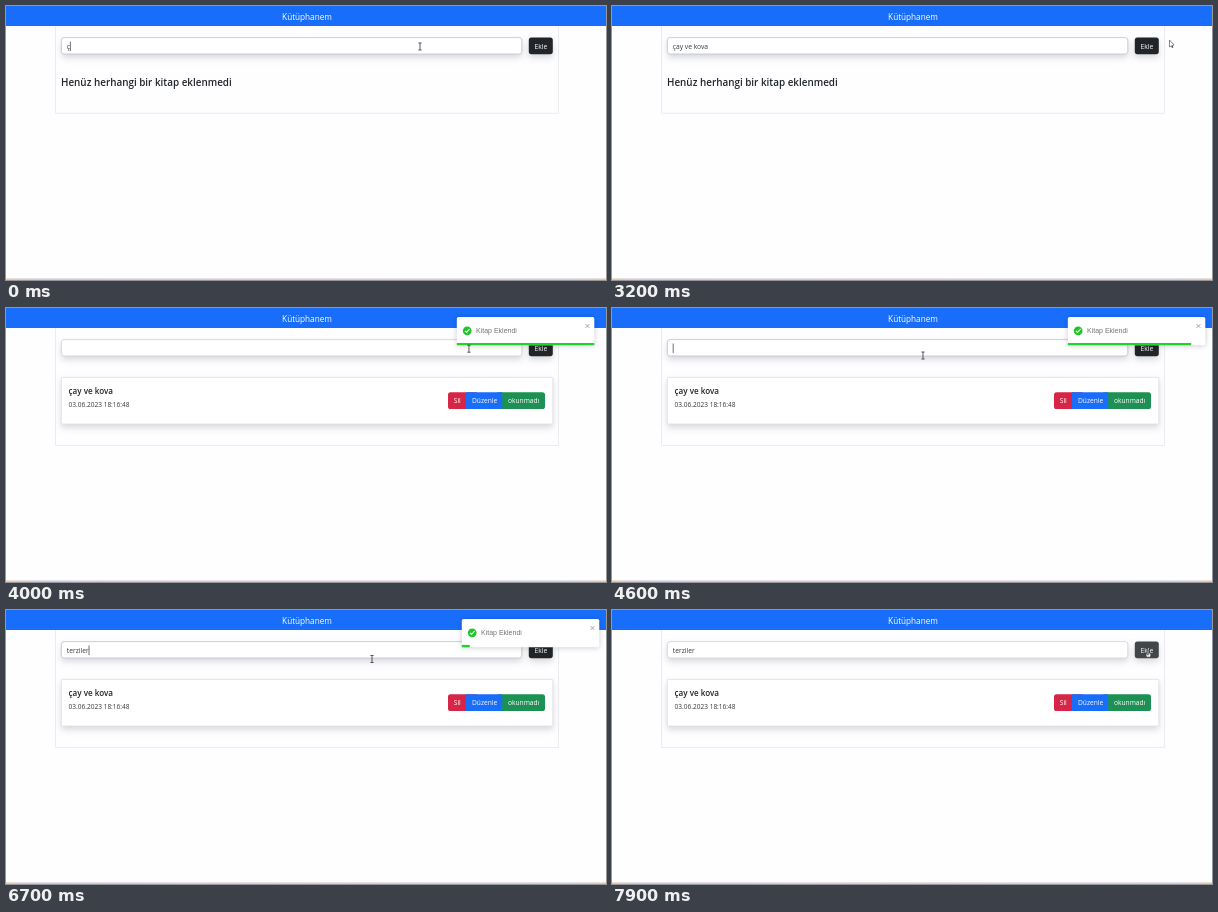
Recreate the animation shown at these times as an HTML page with a canvas. Size 600x274 px, loop 8 s.

```html
<!DOCTYPE html>
<html lang="tr">
<head>
<meta charset="utf-8">
<title>Kütüphanem</title>
<style>
  html, body { margin: 0; width: 100%; height: 100%; overflow: hidden; background: #fefdff; }
  canvas { display: block; width: 600px; height: 274px; }
</style>
</head>
<body>
<canvas id="stage"></canvas>
<script>
const W = 600, H = 274, LOOP = 8000, SCALE = 0.43;
const UI = '"Open Sans", "Noto Sans", sans-serif';
const BLUE = '#186dfb', DARK = '#212529', GREEN = '#20d32c';
const BOOK = 'çay ve kova', NEXT = 'terziler';
const ADDED = 3500, FOCUS = 4450, TYPE = 5000, BLUR = 7850;
const TOAST_IN = 3650, TOAST_RUN = 4345, TOAST_OUT = 6845, BOUNCE = 700;

// Pointer stops: time, x, y
const MOUSE = [
  { t: 2700, x: 414, y: 40.5 },
  { t: 3200, x: 557.5, y: 34 },
  { t: 3500, x: 540, y: 41 },
  { t: 3600, x: 546, y: 37 },
  { t: 4600, x: 311, y: 47.5 },
  { t: 6700, x: 366, y: 49 },
  { t: 7900, x: 536, y: 40 }
];

const canvas = document.getElementById('stage');
const ctx = canvas.getContext('2d');
const dpr = window.devicePixelRatio || 1;
canvas.width = W * dpr;
canvas.height = H * dpr;

const clamp = v => Math.max(0, Math.min(1, v));
const mix = (a, b, p) => a + (b - a) * p;
const smooth = v => { const p = clamp(v); return p * p * (3 - 2 * p); };
const easeOut = p => 1 - (1 - clamp(p)) ** 3;

function pointer(t) {
  const next = MOUSE.findIndex(m => m.t > t);
  if (next === 0) return MOUSE[0];
  if (next < 0) return MOUSE[MOUSE.length - 1];
  const a = MOUSE[next - 1], b = MOUSE[next];
  const p = smooth((t - a.t) / (b.t - a.t));
  return { x: mix(a.x, b.x, p), y: mix(a.y, b.y, p) };
}

function text(str, x, y, size, color, weight = 400, family = UI) {
  ctx.font = `${weight} ${size}px ${family}`;
  ctx.fillStyle = color;
  ctx.fillText(str, x, y);
}

function box(x, y, w, h, r, fill, stroke) {
  ctx.beginPath();
  ctx.roundRect(x, y, w, h, r);
  if (fill) { ctx.fillStyle = fill; ctx.fill(); }
  if (stroke) {
    ctx.shadowColor = 'transparent';
    ctx.strokeStyle = stroke;
    ctx.lineWidth = 0.8;
    ctx.stroke();
  }
}

function shadowed(dy, blur, alpha, draw) {
  ctx.save();
  ctx.shadowColor = `rgba(0,0,0,${alpha})`;
  ctx.shadowOffsetY = dy * dpr;
  ctx.shadowBlur = blur * dpr;
  draw();
  ctx.restore();
}

function line(x1, y1, x2, y2, color, width) {
  ctx.beginPath();
  ctx.moveTo(x1, y1);
  ctx.lineTo(x2, y2);
  ctx.strokeStyle = color;
  ctx.lineWidth = width;
  ctx.stroke();
}

// One letter per step; the caret blinks from the latest keystroke.
function typeOut(str, t, start, step) {
  const n = Math.max(0, Math.min(str.length, 1 + Math.floor((t - start) / step)));
  const last = n ? start + (n - 1) * step : FOCUS;
  return { str: str.slice(0, n), caret: Math.floor((t - last) / 500) % 2 === 0 };
}

function field(t) {
  if (t < ADDED) return typeOut(BOOK, t, 0, 240);
  if (t < FOCUS) return { str: '', caret: false };
  return typeOut(NEXT, t, TYPE, 200);
}

function drawForm(t, mouse) {
  const { str, caret } = field(t);
  const focus = t < ADDED || (t >= FOCUS && t < BLUR);
  shadowed(3.4, 6.9, 0.15, () =>
    box(55.4, 31.6, 460.4, 16.4, 2.6, '#fff', focus ? '#b6c5db' : '#ced3d9'));
  text(str, 60.8, 42.5, 6.7, '#34383c');
  if (caret && focus) {
    const x = 61.2 + ctx.measureText(str).width;
    line(x, 35.5, x, 45, '#333', 0.7);
  }
  const hover = overButton(mouse);
  shadowed(3.4, 6.9, 0.15, () => box(522.8, 31.4, 24, 16.8, 2.6, hover ? '#424649' : DARK));
  text('Ekle', 528.4, 42.6, 6.8, '#fff');
}

function drawCard() {
  shadowed(3.4, 6.9, 0.15, () => box(55.4, 69.4, 491.4, 46.6, 0.5, '#fff', '#e0e0e3'));
  text(BOOK, 62.5, 86, 8.1, DARK, 600);
  text('03.06.2023 18:16:48', 62.5, 99.3, 6.55, '#34383c');
  box(442, 84.2, 30, 16.8, 2.6, '#d62546');
  box(490, 84.2, 49, 16.8, 2.6, '#1d9154');
  box(460, 84.2, 36.2, 16.8, 0, BLUE);
  text('Sil', 447.8, 95.4, 6.65, '#fff');
  text('Düzenle', 466, 95.4, 6.65, '#fff');
  text('okunmadı', 502, 95.4, 6.65, '#fff');
}

// Flies in past its place and wobbles to rest; leaves with a short pull back.
function toastX(t) {
  if (t < TOAST_RUN) {
    const p = (t - TOAST_IN) / BOUNCE, q = p - 0.6;
    return q < 0
      ? mix(3000, -25, easeOut(p / 0.6))
      : -25 * Math.exp(-6 * q) * Math.cos(Math.PI * q / 0.15);
  }
  const p = (t - TOAST_OUT) / BOUNCE;
  return 2020 * smooth((p - 0.2) / 0.8) - 20 * smooth(p / 0.2);
}

function drawToast(t) {
  if (t < TOAST_IN || t > TOAST_OUT + BOUNCE) return;
  ctx.save();
  ctx.translate(toastX(t) * SCALE, 0);
  ctx.globalAlpha = 1 - smooth(((t - TOAST_OUT) / BOUNCE - 0.2) / 0.8);
  shadowed(0.5, 5, 0.2, () => box(455.8, 9, 137.5, 28.3, 1.7, '#fff'));
  box(461.8, 18.4, 8.8, 8.8, 4.4, '#20c52a');
  line(464, 22.8, 465.8, 24.6, '#fff', 1.1);
  line(465.4, 24.6, 468.6, 21, '#fff', 1.1);
  text('Kitap Eklendi', 475, 25.3, 7, '#757575', 400, '"Liberation Sans", Arial, sans-serif');
  for (const d of [-1.9, 1.9]) line(586.5 - d, 16.1, 586.5 + d, 19.9, '#8d8d8d', 0.8);
  const left = 1 - clamp((t - TOAST_RUN) / (TOAST_OUT - TOAST_RUN));
  box(455.8, 34.9, 137.5 * left, 2.4, 0, GREEN);
  ctx.restore();
}

const overInput = ({ x, y }) => x > 55 && x < 516 && y > 31 && y < 50;
const overButton = ({ x, y }) => x > 522 && x < 547 && y > 31 && y < 48;

function drawBeam(x, y) {
  line(x, y - 3.5, x, y + 3.5, '#333', 0.8);
  for (const d of [-3.5, 3.5]) line(x - 1.6, y + d, x + 1.6, y + d, '#333', 0.8);
}

function drawHand(x, y) {
  box(x - 2, y + 3, 4.8, 4.2, 1.2, '#fff', '#333');
  box(x - 0.8, y, 1.6, 5, 0.8, '#fff', '#333');
}

function drawArrow(x, y) {
  line(x + 2, y + 5, x + 3.2, y + 7.8, '#555', 1.5);
  ctx.beginPath();
  ctx.moveTo(x, y);
  ctx.lineTo(x, y + 6.8);
  ctx.lineTo(x + 4.6, y + 5);
  ctx.closePath();
  ctx.fillStyle = '#fff';
  ctx.fill();
  ctx.strokeStyle = '#555';
  ctx.lineWidth = 0.7;
  ctx.stroke();
}

function drawMouse(m) {
  const draw = overInput(m) ? drawBeam : overButton(m) && m.x < 545 ? drawHand : drawArrow;
  draw(m.x, m.y);
}

function drawEdge() {
  const g = ctx.createLinearGradient(0, 0, W, 0);
  g.addColorStop(0, '#ecc9a4');
  g.addColorStop(0.05, '#cfcbe0');
  g.addColorStop(0.45, '#e6c8d4');
  g.addColorStop(0.95, '#d0cedd');
  g.addColorStop(1, '#ecc9a4');
  ctx.fillStyle = g;
  ctx.fillRect(0, 272.4, W, 1.6);
}

function render(t) {
  const mouse = pointer(t);
  const added = t >= ADDED;
  ctx.setTransform(dpr, 0, 0, dpr, 0, 0);
  ctx.fillStyle = '#fefdff';
  ctx.fillRect(0, 0, W, H);
  box(49.5, 19.5, 503, added ? 118 : 87.8, 0, null, '#e8e7eb');
  box(0, 0, W, 20, 0, BLUE);
  ctx.textAlign = 'center';
  text('Kütüphanem', 301, 13.5, 8.2, '#fff');
  ctx.textAlign = 'left';
  drawForm(t, mouse);
  if (added) drawCard();
  else text('Henüz herhangi bir kitap eklenmedi', 55, 80, 9.9, DARK, 600);
  drawEdge();
  drawToast(t);
  drawMouse(mouse);
}

const start = performance.now();
function tick() {
  render((performance.now() - start) % LOOP);
  requestAnimationFrame(tick);
}
tick();
</script>
</body>
</html>
```
